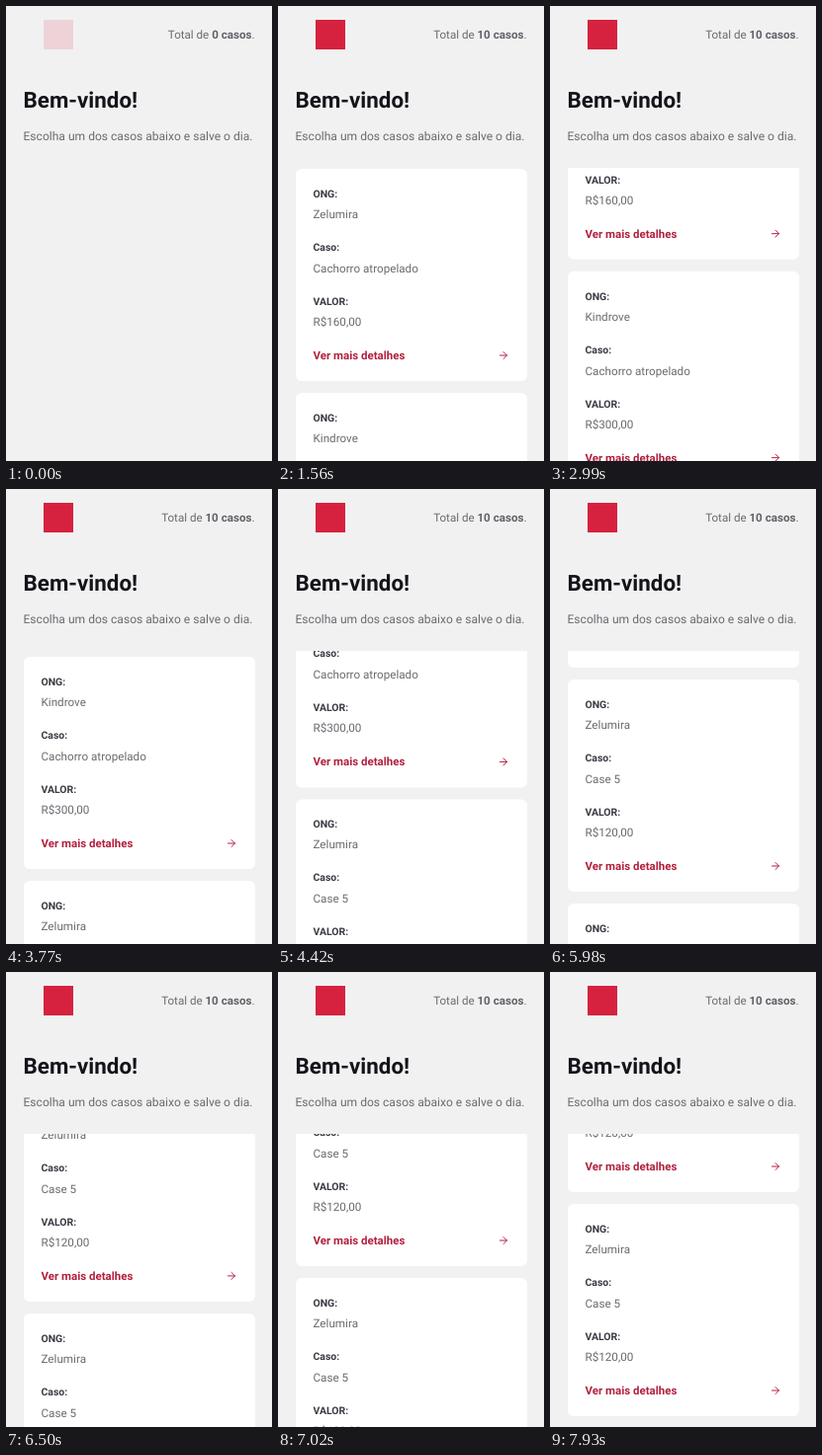
An HTML page that plays this animation: 269x461 px, repeating every 8 s.

```html
<!DOCTYPE html>
<html lang="pt-BR">
<head>
<meta charset="utf-8">
<title>Casos</title>
<style>
  html, body { margin: 0; width: 100%; height: 100%; overflow: hidden; }
  body { position: relative; background: #f1f1f1; color: #6a6a71; font-family: Roboto, sans-serif;
         text-rendering: geometricPrecision; }
  .line { position: absolute; left: 17.5px; height: 20px; line-height: 20px; white-space: nowrap; }
  #logo { position: absolute; left: 38px; top: 14px; width: 30px; height: 30px; background: #d6213f; }
  #total { left: auto; right: 17.5px; top: 19px; font-size: 11.6px; }
  #total b { color: #606068; }
  #title { top: 86px; font-size: 22.4px; font-weight: 700; color: #13131a; }
  #intro { top: 122px; font-size: 12.07px; }
  #view { position: absolute; left: 0; right: 0; top: 164px; bottom: 0; overflow: hidden; }
  #list { position: absolute; left: 18px; top: 1px; width: 234px; }
  .card { position: absolute; width: 100%; height: 215px; border-radius: 6px; background: #fff; }
  .label { font-size: 10.46px; font-weight: 700; color: #3a3a44; }
  .value { font-size: 11.68px; }
  .more { font-size: 11.5px; font-weight: 700; color: #b2203f; }
  .arrow { position: absolute; left: 204px; top: 183px; width: 12px; height: 12px;
           fill: none; stroke: #b2203f; stroke-width: 2; stroke-linecap: round; stroke-linejoin: round; }
</style>
</head>
<body>
  <div id="logo"></div>
  <div id="total" class="line">Total de <b><span id="count">0</span> casos</b>.</div>
  <div id="title" class="line">Bem-vindo!</div>
  <div id="intro" class="line">Escolha um dos casos abaixo e salve o dia.</div>
  <div id="view"><div id="list"></div></div>

<script>
const LOOP = 8000, TICK = 130, PITCH = 227, ROW = 54.4, TOTAL = 10;
const $ = id => document.getElementById(id);
const logo = $('logo'), count = $('count'), view = $('view'), list = $('list');

const cases = [
  ['Zelumira', 'Cachorro atropelado', 'R$160,00'],
  ['Kindrove', 'Cachorro atropelado', 'R$300,00']
];
while (cases.length < TOTAL) cases.push(['Zelumira', 'Case 5', 'R$120,00']);

const line = (kind, mid, text) =>
  `<div class="line ${kind}" style="top:${mid - 10}px">${text}</div>`;

list.innerHTML = cases.map((values, i) =>
  `<div class="card" style="top:${i * PITCH}px">` +
  ['ONG:', 'Caso:', 'VALOR:'].map((label, k) =>
    line('label', 26 + k * ROW, label) + line('value', 46.4 + k * ROW, values[k])
  ).join('') +
  line('more', 189.4, 'Ver mais detalhes') +
  '<svg class="arrow" viewBox="0 0 24 24"><path d="M5 12h14M12 5l7 7-7 7"/></svg></div>'
).join('');
const arrows = document.querySelectorAll('.arrow');

// Each swipe: start, end, distance reached, sharpness of the slowdown
const swipes = [
  [2600, 3770, 222, 2],
  [3770, 4160, 225, 1],
  [4290, 4940, 446, 2],
  [4940, 5200, 647, 1.5],
  [5200, 5980, 653, 2],
  [6110, 7020, 763, 2],
  [7150, 7540, 837, 2],
  [7670, 7930, 838, 1]
];

function scrollAt(t) {
  let from = 0;
  for (const [start, end, to, power] of swipes) {
    if (t < start) break;
    const p = Math.min(1, (t - start) / (end - start));
    if (p < 1) return from + (to - from) * (1 - (1 - p) ** power);
    from = to;
  }
  return from;
}

function draw(now) {
  const t = Math.floor((now % LOOP) / TICK) * TICK;
  const loaded = t >= 780;
  logo.style.opacity = t < 130 ? .14 : t < 260 ? .65 : 1;
  count.textContent = loaded ? TOTAL : 0;
  view.style.visibility = loaded ? 'visible' : 'hidden';
  for (const arrow of arrows) arrow.style.opacity = t < 1560 ? 0 : 1;
  list.style.transform = `translateY(${-scrollAt(t)}px)`;
}

const origin = performance.now();
function loop() {
  draw(performance.now() - origin);
  requestAnimationFrame(loop);
}
loop();
</script>
</body>
</html>
```
